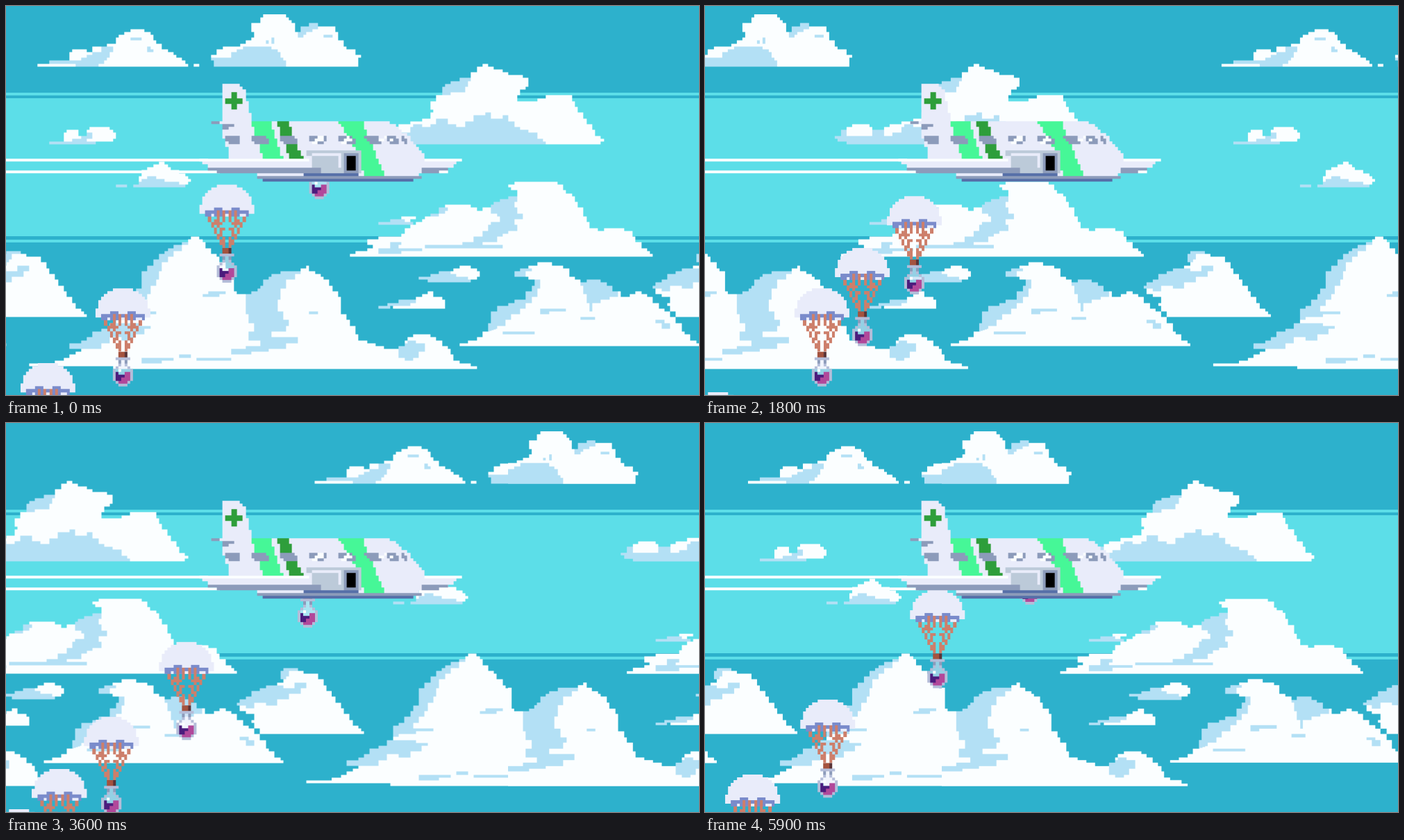
Recreate the animation shown at these times as an HTML page without scripts. Size 998 by 561 pixels, loop 6000 ms.

```html
<!DOCTYPE html>
<html lang="en">
<head>
<meta charset="utf-8">
<title>Potion drop</title>
<style>
  html, body { margin: 0; width: 100%; height: 100%; overflow: hidden; background: #2db1cc; }
  svg { display: block; width: 100%; height: 100%; }
  .sky { fill: #5cdee8; }
  .white { fill: #fbfeff; }
  .shade { fill: #b3e0f5; }
  .hull { fill: #e9ecfa; }
  .steel { fill: #8c9bba; }
  .silver { fill: #bccad9; }
  .keel { fill: #566fa8; }
  .mint { fill: #46f797; }
  .leaf { fill: #2e9e3b; }
  .hem { fill: #7a8bcb; }
  .cord { fill: #cd7f6b; }

  #drift { animation: drift 6s steps(60) -.01s infinite; }
  .drop { animation: drop 6s var(--at) infinite; }
  .chute { animation: open 6s step-end var(--at) infinite; }

  @keyframes drift { to { transform: translateX(-240px); } }

  /* free fall, canopy jerk, then a slow glide */
  @keyframes drop {
    0% { transform: translate(36px, -33px); animation-timing-function: steps(5); }
    8.3333% { transform: translate(16px, -13px); animation-timing-function: step-end; }
    10% { transform: translate(8px, -8px); animation-timing-function: steps(2); }
    13.3333% { transform: translate(0, 0); animation-timing-function: steps(52); }
    100% { transform: translate(-104px, 104px); }
  }
  @keyframes open { 0% { opacity: 0; } 10%, 100% { opacity: 1; } }
</style>
</head>
<body>
<svg viewBox="0 0 240 135" preserveAspectRatio="none" shape-rendering="crispEdges">
  <defs>
    <g id="clouds">
      <g class="white">
        <!-- top row -->
        <path d="M11 21 V20 H16 V19 H22 V16 H23 V15 H28 V16 H30 V14 H35 V13 H38 V11 H39 V10 H41 V9 H43 V8 H48 V9 H50 V10 H51 V12 H52 V13 H54 V15 H56 V16 H58 V17 H59 V18 H61 V19 H62 V20 H63 V21 Z"/>
        <path d="M65 20 h2 v1 h-2 z"/>
        <path d="M72 21 V19 H71 V17 H73 V15 H75 V14 H81 V13 H83 V12 H85 V11 H86 V9 H85 V6 H88 V4 H89 V3 H97 V4 H98 V5 H99 V6 H100 V9 H102 V7 H105 V6 H108 V7 H114 V9 H115 V12 H117 V14 H118 V15 H121 V17 H123 V18 H122 V21 Z"/>
        <!-- light band -->
        <path d="M121 48 V47 H118 V46 H117 V45 H119 V43 H121 V42 H123 V41 H129 V42 H130 V43 H134 V42 H136 V41 H140 V40 H144 V39 H147 V37 H148 V35 H180 V48 Z"/>
        <path d="M147 36 V33 H149 V31 H151 V28 H152 V27 H154 V26 H157 V25 H161 V23 H163 V21 H165 V20 H167 V21 H169 V22 H172 V23 H174 V24 H179 V25 H181 V28 H180 V29 H178 V31 H177 V36 Z"/>
        <path d="M177 48 V33 H184 V32 H187 V31 H196 V33 H197 V35 H198 V37 H200 V39 H201 V41 H203 V43 H204 V45 H206 V46 H207 V47 H206 V48 Z"/>
        <path d="M20 47 V44 H21 V43 H25 V45 H28 V43 H29 V42 H36 V43 H37 V44 H38 V46 H37 V47 Z"/>
        <path d="M46 62 V59 H47 V57 H49 V56 H51 V55 H53 V54 H55 V55 H56 V56 H57 V57 H60 V58 H62 V59 H63 V60 H64 V61 H63 V62 Z"/>
        <path d="M119 87 V86 H121 V85 H125 V84 H127 V83 H125 V81 H129 V80 H137 V79 H138 V77 H140 V76 H142 V75 H144 V74 H145 V73 H147 V72 H150 V70 H152 V69 H161 V70 H163 V71 H168 V87 Z"/>
        <path d="M165 87 V70 H168 V69 H169 V68 H171 V67 H174 V66 H177 V64 H175 V63 H174 V62 H176 V61 H191 V62 H193 V64 H194 V65 H196 V66 H197 V68 H198 V70 H200 V73 H201 V75 H202 V77 H205 V78 H207 V77 H214 V78 H217 V80 H218 V82 H220 V84 H222 V85 H223 V86 H224 V87 Z"/>
        <path d="M135 75 V74 H137 V73 H142 V74 H140 V75 Z"/>
        <!-- lower sky -->
        <path d="M8 125 V124 H17 V123 H20 V122 H22 V121 H24 V120 H26 V119 H22 V117 H26 V116 H28 V115 H30 V113 H33 V112 H36 V110 H38 V107 H85 V126 H37 V125 Z"/>
        <path d="M38 108 V105 H40 V104 H42 V102 H44 V100 H45 V98 H47 V92 H49 V90 H51 V88 H53 V86 H55 V85 H56 V84 H58 V83 H61 V82 H63 V81 H64 V80 H67 V81 H68 V82 H69 V84 H71 V86 H73 V87 H74 V89 H76 V91 H77 V92 H79 V99 H80 V100 H85 V108 Z"/>
        <path d="M84 126 V100 H85 V99 H87 V98 H88 V97 H89 V95 H91 V94 H92 V93 H95 V92 H102 V91 H104 V90 H105 V92 H107 V93 H109 V94 H110 V95 H112 V97 H113 V99 H115 V101 H116 V107 H118 V109 H119 V111 H121 V126 Z"/>
        <path d="M121 126 V114 H122 V116 H125 V117 H128 V118 H131 V119 H136 V118 H138 V116 H139 V115 H141 V114 H147 V115 H149 V116 H151 V118 H153 V119 H154 V121 H155 V123 H157 V124 H161 V125 H163 V126 Z"/>
        <path d="M157 118 V117 H160 V116 H163 V115 H165 V113 H167 V110 H168 V106 H170 V104 H174 V103 H176 V102 H180 V99 H182 V97 H183 V95 H181 V94 H176 V92 H178 V91 H181 V90 H184 V89 H189 V90 H193 V91 H195 V94 H197 V95 H199 V118 Z"/>
        <path d="M199 118 V96 H201 V95 H206 V96 H208 V97 H210 V99 H213 V101 H216 V100 H218 V99 H220 V100 H222 V101 H224 V103 H226 V105 H228 V106 H230 V108 H232 V110 H234 V113 H235 V114 H237 V116 H239 V117 H240 V118 Z"/>
        <path d="M232 108 V106 H230 V104 H229 V103 H230 V101 H227 V100 H225 V98 H224 V97 H225 V96 H227 V95 H229 V93 H232 V92 H234 V91 H238 V90 H240 V89 H239 V86 H240 V85 H245 V86 H247 V87 H252 V89 H254 V91 H255 V93 H257 V95 H258 V97 H260 V99 H261 V101 H263 V103 H264 V105 H266 V106 H267 V107 H268 V108 Z"/>
        <path d="M151 95 V92 H155 V91 H157 V90 H161 V91 H163 V92 H164 V94 H163 V95 Z"/>
        <path d="M134 105 V104 H139 V102 H142 V101 H144 V100 H146 V99 H148 V101 H151 V102 H152 V105 Z"/>
      </g>
      <g class="shade">
        <path d="M15 20 V19 H26 V18 H28 V17 H30 V16 H33 V14 H37 V16 H36 V18 H35 V19 H34 V20 H32 V21 H24 V20 Z"/>
        <path d="M43 11 h4 v1 h-4 z M49 14 h1 v1 h1 v1 h-2 z"/>
        <path d="M72 21 V19 H71 V18 H78 V16 H80 V15 H82 V14 H92 V15 H94 V16 H95 V18 H96 V19 H97 V21 Z"/>
        <path d="M101 11 V9 H102 V7 H105 V6 H108 V8 H106 V9 H104 V10 H103 V11 Z"/>
        <path d="M90 12 h1 v1 h-1 z M92 11 h1 v2 h-1 z M110 10 h3 v1 h-3 z"/>
        <path d="M121 48 V47 H118 V46 H117 V45 H119 V43 H121 V45 H130 V43 H134 V45 H137 V44 H140 V42 H141 V41 H144 V42 H147 V41 H149 V39 H153 V41 H156 V42 H159 V40 H162 V38 H166 V37 H168 V39 H172 V38 H174 V40 H176 V42 H178 V43 H181 V44 H184 V46 H186 V47 H187 V48 Z"/>
        <path d="M151 31 V28 H152 V27 H154 V26 H157 V25 H161 V26 H160 V28 H159 V30 H154 V31 Z"/>
        <path d="M15 47 h16 v1 h-16 z M23 46 h3 v-1 h2 v-1 h2 v2 h-2 v1 h-5 z"/>
        <path d="M38 62 h4 v1 h-4 z M44 63 V62 H46 V61 H47 V60 H49 V59 H52 V60 H55 V61 H60 V62 H62 V63 Z"/>
        <path d="M168 70 V69 H169 V68 H171 V67 H174 V66 H177 V68 H176 V70 H177 V72 H179 V74 H176 V76 H177 V78 H174 V79 H172 V80 H170 V82 H165 V83 H158 V82 H162 V80 H165 V78 H167 V76 H168 V75 H171 V73 H170 V72 H168 Z"/>
        <path d="M129 86 v-2 h4 v-2 h4 v1 h-1 v1 h8 v1 h-7 v1 z M145 83 h27 v1 h-27 z M147 73 v-1 h3 v-2 h3 v1 h-1 v1 h-2 v1 z"/>
        <path d="M129 75 h4 v-1 h5 v1 h3 v1 h-12 z"/>
        <path d="M38 109 V105 H40 V104 H42 V102 H44 V100 H45 V98 H47 V92 H49 V90 H51 V88 H53 V86 H55 V85 H56 V84 H58 V83 H61 V82 H63 V83 H61 V85 H58 V87 H56 V89 H54 V92 H53 V95 H52 V97 H50 V100 H49 V102 H47 V104 H45 V106 H52 V107 H46 V108 H40 V109 Z"/>
        <path d="M22 119 V117 H26 V116 H28 V115 H30 V113 H33 V112 H36 V110 H46 V111 H50 V112 H48 V114 H44 V116 H40 V115 H36 V117 H33 V119 Z"/>
        <path d="M83 101 V100 H85 V99 H87 V98 H88 V97 H89 V95 H91 V94 H92 V93 H95 V92 H102 V93 H100 V95 H97 V98 H95 V102 H94 V106 H96 V109 H98 V111 H97 V113 H92 V115 H101 V117 H97 V119 H91 V120 H85 V121 H78 V119 H83 V118 H88 V116 H84 V113 H86 V110 H84 V107 H83 Z"/>
        <path d="M47 122 h11 v1 h-4 v1 h-7 z M60 121 h4 v1 h-4 z M68 100 h2 v-1 h6 v1 h-2 v1 h-6 z M66 122 h12 v1 h-12 z M105 106 h3 v1 h-3 z"/>
        <path d="M136 121 V118 H138 V117 H139 V116 H142 V117 H145 V120 H143 V122 H141 V123 H138 V122 H136 Z"/>
        <path d="M167 113 V110 H168 V106 H170 V104 H174 V103 H176 V102 H180 V99 H182 V97 H183 V95 H185 V98 H184 V101 H182 V103 H180 V105 H178 V107 H175 V109 H173 V111 H170 V112 Z"/>
        <path d="M176 94 v-2 h2 v-1 h4 v1 h-2 v2 z"/>
        <path d="M199 97 V96 H201 V95 H206 V96 H208 V97 H210 V99 H212 V101 H209 V102 H206 V103 H203 V106 H202 V103 H201 V100 H200 V97 Z"/>
        <path d="M185 105 h9 v1 h-6 v1 h-3 z M172 113 h11 v1 h-11 z M225 109 h3 v1 h2 v2 h-3 v-2 h-2 z M199 108 h5 v1 h-5 z"/>
        <path d="M224 98 V97 H225 V96 H227 V95 H229 V93 H232 V92 H234 V91 H240 V92 H244 V90 H248 V92 H246 V94 H242 V96 H238 V98 H234 V97 H230 V99 H227 V98 Z"/>
        <path d="M239 89 v-3 h1 v-1 h5 v1 h-3 v2 h-1 v1 z"/>
        <path d="M143 94 H147 V93 H150 V92 H154 V93 H156 V94 H160 V95 H161 V96 H146 V95 H143 Z"/>
        <path d="M129 104 H132 V103 H136 V102 H142 V103 H140 V104 H133 V105 H129 Z"/>
      </g>
    </g>

    <g id="canopy">
      <path class="hull" d="M6 0 H13 V1 H15 V2 H16 V3 H17 V4 H18 V7 H19 V10 H17 V11 H2 V10 H0 V7 H1 V4 H2 V3 H3 V2 H4 V1 H6 Z"/>
      <path class="hem" d="M2 9 H5 V8 H8 V9 H11 V8 H14 V9 H17 V11 H16 V10 H14 V11 H11 V10 H8 V11 H5 V10 H4 V11 H2 Z"/>
      <g class="cord">
        <g id="cords">
          <path d="M3 11 h1 v2 h1 v2 h1 v2 h1 v2 h1 v2 h1 v1 h-1 v-1 h-1 v-2 h-1 v-2 h-1 v-2 h-1 v-2 h-1 z"/>
          <path d="M6 9 h1 v4 h1 v-4 h1 v4 h-1 v1 h-1 v1 h2 v1 h-1 v2 h1 v4 h-1 v-4 h-1 v-3 h-1 z M5 12 h1 v2 h-1 z"/>
        </g>
        <use href="#cords" transform="matrix(-1 0 0 1 19 0)"/>
      </g>
    </g>

    <g id="bottle">
      <path fill="#a4533f" d="M8 22 h2 v2 h-2 z"/>
      <path fill="#5b3437" d="M10 22 h1 v2 h-1 z"/>
      <path fill="#e9ecfa" opacity=".55" d="M8 25 h3 v2 h1 v1 h1 v4 h-1 v1 h-5 v-1 h-1 v-4 h1 v-1 h1 z"/>
      <path fill="#b4bdd9" fill-rule="evenodd" d="M7 24 H12 V25 H11 V27 H12 V28 H13 V32 H12 V33 H11 V34 H8 V33 H7 V32 H6 V28 H7 V27 H8 V25 H7 Z M9 25 V27 H8 V28 H7 V32 H8 V33 H11 V32 H12 V28 H11 V27 H10 V25 Z"/>
      <path class="steel" d="M8 25 h1 v1 h-1 z M10 25 h1 v1 h-1 z"/>
      <path fill="#b1489a" d="M7 30 h3 v-1 h2 v3 h-1 v1 h-3 v-1 h-1 z"/>
      <path fill="#4b1c7d" d="M7 29 h1 v1 h2 v1 h-1 v1 h-2 z"/>
      <path class="white" d="M8 28 h1 v1 h-1 z"/>
    </g>
  </defs>

  <rect width="240" height="135" fill="#2db1cc"/>
  <path class="sky" d="M0 30 h240 v1 h-240 z M0 32 h240 v48 h-240 z M0 81 h240 v1 h-240 z"/>

  <g id="drift">
    <use href="#clouds" x="-240"/>
    <use href="#clouds"/>
    <use href="#clouds" x="240"/>
  </g>

  <path class="white" d="M0 53 h70 v1 h-70 z M0 57 h74 v1 h-74 z"/>

  <g transform="translate(67 62)">
    <g class="drop" style="--at: -2.61s"><use class="chute" href="#canopy"/><use href="#bottle"/></g>
    <g class="drop" style="--at: -3.91s"><use class="chute" href="#canopy"/><use href="#bottle"/></g>
    <g class="drop" style="--at: -5.21s"><use class="chute" href="#canopy"/><use href="#bottle"/></g>
    <g class="drop" style="--at: -.11s"><use class="chute" href="#canopy"/><use href="#bottle"/></g>
    <g class="drop" style="--at: -.81s"><use class="chute" href="#canopy"/><use href="#bottle"/></g>
  </g>

  <g id="plane">
    <path class="hull" d="M75 27 H81 V28 H82 V29 H83 V33 H84 V37 H85 V40 H133 V41 H135 V42 H136 V43 H137 V44 H139 V45 H140 V47 H141 V48 H142 V49 H143 V50 H144 V51 H145 V56 H144 V58 H143 V59 H87 V57 H77 V49 H76 V46 H75 Z"/>
    <path class="leaf" d="M78 30 h2 v2 h2 v2 h-2 v2 h-2 v-2 h-2 v-2 h2 z"/>
    <path class="steel" d="M71 40 h3 v1 h-3 z M75 41 h4 v1 h-2 v1 h-2 z"/>
    <path class="hull" d="M74 40 h5 v1 h-5 z"/>
    <path class="mint" d="M85 40 H92 V43 H93 V46 H94 V49 H95 V52 H96 V53 H89 V51 H88 V48 H87 V45 H86 V42 H85 Z"/>
    <path class="leaf" d="M94 40 H98 V42 H99 V45 H100 V48 H101 V50 H102 V52 H103 V53 H98 V51 H97 V48 H96 V45 H95 V42 H94 Z"/>
    <path class="mint" d="M115 40 H124 V43 H125 V46 H126 V48 H127 V50 H128 V53 H129 V55 H130 V57 H131 V59 H124 V57 H123 V54 H122 V51 H121 V49 H120 V47 H119 V45 H118 V44 H117 V42 H116 V41 H115 Z"/>
    <g class="steel">
      <path d="M76 45 h5 v3 h-4 v-1 h-1 z M85 45 h5 v1 h1 v2 h-5 v-1 h-1 z M95 45 h5 v1 h1 v2 h-5 v-1 h-1 z"/>
      <path d="M105 45 h6 v2 h-1 v1 h-4 v-1 h-1 z M115 45 h5 v1 h1 v2 h-5 v-1 h-1 z"/>
      <path d="M124 45 h5 v1 h1 v2 h-4 v-1 h-1 v-1 h-1 z M131 45 h4 v1 h1 v2 h-3 v-1 h-1 v-1 h-1 z M137 45 h1 v1 h1 v2 h-1 v-1 h-1 z"/>
    </g>
    <path class="white" d="M107 46 h1 v-1 h2 v2 h-2 v1 h-2 v-1 h1 z M117 46 h1 v-1 h1 v1 h1 v1 h-2 v1 h-2 v-1 h1 z M129 46 h2 v-1 h1 v1 h-1 v1 h-2 z M133 46 h1 v1 h-1 z"/>

    <path class="hull" d="M67 53 H106 V56 H70 V55 H68 V54 H67 Z M145 53 H158 V54 H156 V55 H155 V56 H145 Z"/>
    <path class="white" d="M67 53 h38 v1 h-38 z M145 53 h13 v1 h-13 z M150 57 h3 v1 h-3 z"/>
    <path class="steel" d="M70 56 H109 V58 H73 V57 H70 Z M144 56 H153 V57 H150 V58 H144 Z M87 59 H144 V60 H87 Z"/>
    <path class="keel" d="M103 58 h19 v1 h-19 z M89 60 h52 v1 h-52 z"/>

    <path class="silver" d="M104 50 H123 V58 H109 V56 H106 V52 H104 Z"/>
    <path class="hull" d="M106 51 h10 v5 h-1 v-4 h-9 z"/>
    <path class="steel" d="M117 51 h5 v7 h-5 z"/>
    <path d="M118 52 h3 v5 h-3 z"/>
  </g>
</svg>
</body>
</html>
```
